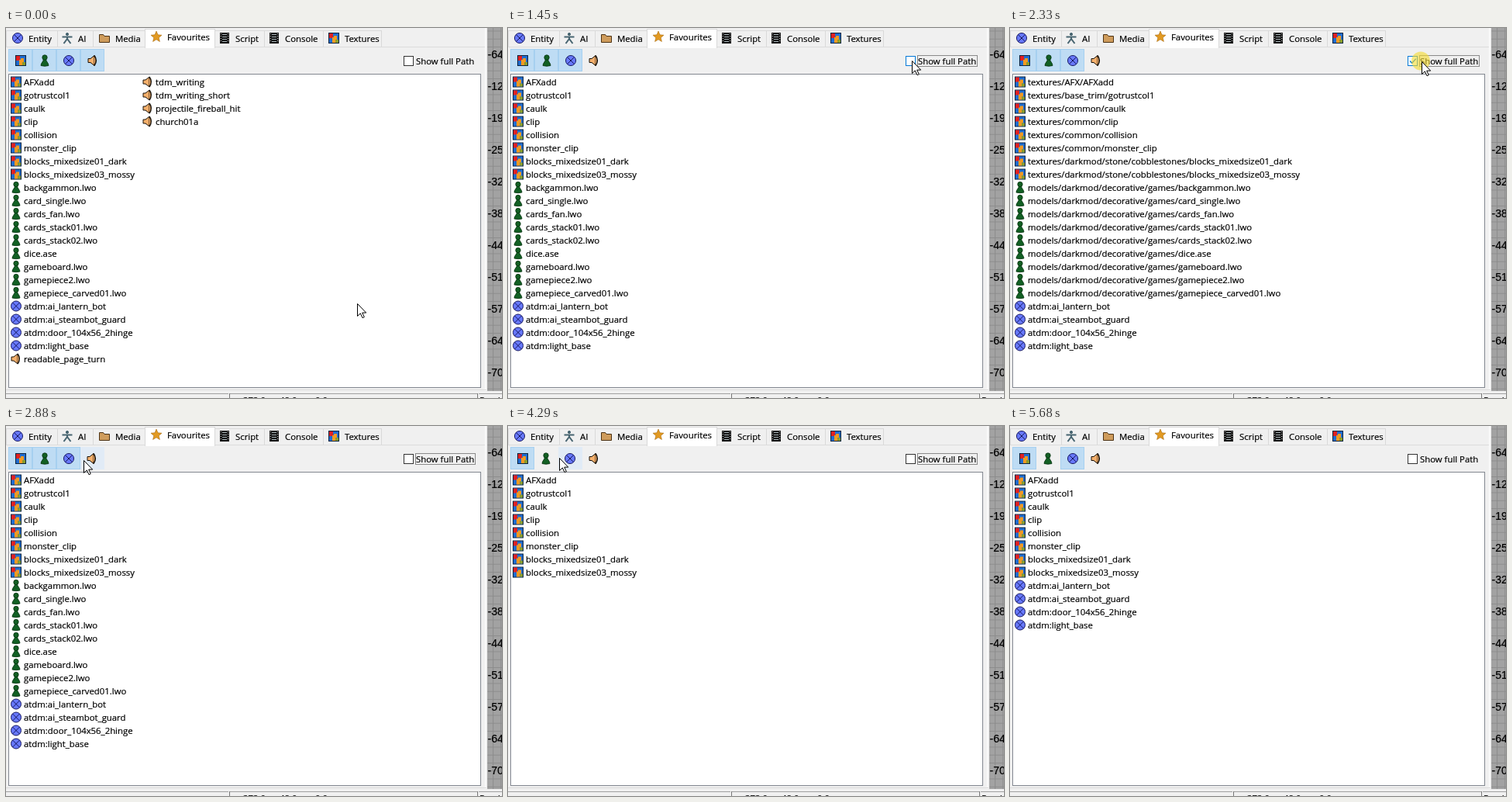
An HTML page for the animation above (5770 ms loop, 640x477 px).

```html
<!DOCTYPE html>
<html lang="en">
<head>
<meta charset="utf-8">
<title>Favourites panel</title>
<style>
  html, body { margin: 0; width: 100%; height: 100%; overflow: hidden; background: #f0f0f0; }
  svg { display: block; width: 640px; height: 477px; }
  text { font: 11.35px "Open Sans", "Noto Sans", sans-serif; white-space: pre; stroke: #000; stroke-width: .2px; }
  .ruler { font: 14px "Liberation Sans", Arial, sans-serif; }
</style>
</head>
<body>
<svg viewBox="0 0 640 477">
  <defs>
    <g id="texture">
      <rect x="-7" y="-7" width="14" height="14" fill="#0b2440"/>
      <path d="M-6-6h12v12h-12z" fill="#1f6cd0"/>
      <path d="M-6-6h5v6h-5z" fill="#e02020"/>
      <path d="M-2-1h2v-2h4v5h-2v4h-4z" fill="#f39a22"/>
      <path d="M2 2h4v4h-4z" fill="#8a9c2c"/>
    </g>
    <g id="model" fill="#126024" stroke="#06300f" stroke-width=".8">
      <path d="M-1.5-2C-1.5 1-5 3-5 6.5Q0 8 5 6.5C5 3 1.5 1 1.5-2z"/>
      <circle cy="-4" r="3.2"/>
    </g>
    <g id="entity" stroke="#15175c">
      <circle r="6.5" fill="#6879ff"/>
      <path d="M-4.5-4.5l9 9M4.5-4.5l-9 9"/>
    </g>
    <g id="sound" stroke="#161008">
      <path d="M-6-2.5h3l5-4v13l-5-4h-3z" fill="#f5b06c"/>
      <path d="M2-6.5q4.5 6.5 0 13" fill="#f5b06c" stroke-width="1.6"/>
    </g>
    <g id="person" fill="none" stroke="#476470" stroke-width="2">
      <circle cy="-5" r="1.6" fill="#476470" stroke-width="1"/>
      <path d="M-6.5-1.5h13M0-2v4M-4.5 7L0 1l4.5 6"/>
    </g>
    <path id="folder" d="M-6.5 5.5v-10h5l1.5 2h6.5v8z" fill="#cf9c5c" stroke="#4c3214"/>
    <path id="star" d="M0-7l2 4.8 5 .4-3.8 3.3 1.2 5L0 3.8-4.4 6.5l1.2-5L-7-1.8l5-.4z" fill="#e29a22" stroke="#a8690f" stroke-width=".6"/>
    <g id="script">
      <path d="M-6-7h12v14h-12z" fill="#111"/>
      <path d="M-3-4.5h6M-3-1.5h6M-3 1.5h6M-3 4.5h6" stroke="#a9b4b8"/>
      <path d="M-4.7-6v12M4.7-6v12" stroke="#ddd" stroke-dasharray="1 2"/>
    </g>
    <path id="arrow" d="M.5.5v16l3.8-3.6 2.7 5.8 2.3-1-2.6-5.6h5z" fill="#fff" stroke="#000"/>
    <pattern id="grid" x="628" y="3.5" width="10.25" height="10.25" patternUnits="userSpaceOnUse">
      <path d="M.5 0v10.25M0 .5h10.25" stroke="#8c8c8c"/>
    </pattern>
  </defs>
  <g id="frame"></g>
  <g id="content"></g>
</svg>
<script>
const LOOP = 5770, STEP = 77;

const icon = (name, x, y) => `<use href="#${name}" x="${x}" y="${y}"/>`;
const label = (text, x, y, extra = '') => `<text x="${x}" y="${y}" ${extra}>${text}</text>`;
const box = (x, y, w, h, fill, stroke = 'none', extra = '') =>
  `<rect x="${x}" y="${y}" width="${w}" height="${h}" fill="${fill}" stroke="${stroke}" ${extra}/>`;

const games = 'models/darkmod/decorative/games/';
const stones = 'textures/darkmod/stone/cobblestones/';
const common = 'textures/common/';
const group = (kind, ...entries) =>
  entries.flatMap(([path, names]) => names.split(' ').map(name => ({ kind, path, name })));
const favourites = [
  ...group('texture', ['textures/AFX/', 'AFXadd'], ['textures/base_trim/', 'gotrustcol1'],
    [common, 'caulk clip collision monster_clip'],
    [stones, 'blocks_mixedsize01_dark blocks_mixedsize03_mossy']),
  ...group('model', [games, 'backgammon.lwo card_single.lwo cards_fan.lwo cards_stack01.lwo ' +
    'cards_stack02.lwo dice.ase gameboard.lwo gamepiece2.lwo gamepiece_carved01.lwo']),
  ...group('entity', ['', 'atdm:ai_lantern_bot atdm:ai_steambot_guard atdm:door_104x56_2hinge atdm:light_base']),
  ...group('sound', ['', 'readable_page_turn tdm_writing tdm_writing_short projectile_fireball_hit church01a'])
];
const kinds = ['texture', 'model', 'entity', 'sound'];

// Pointer moves: first step, last step, destination
const moves = [
  [70, 610, 109, 38], [910, 1300, 515, 42], [1370, 1450, 521, 42], [1530, 1610, 531, 43],
  [2490, 2880, 100, 44], [3030, 3110, 97, 43], [3260, 3420, 81, 41], [3740, 3820, 60, 40],
  [3910, 3990, 50, 40], [4280, 4370, 81, 41], [4600, 4670, 99, 63],
  [4750, 5060, 452, 437], [5130, 5130, 452, 451]
];
const clicks = [760, 1690, 2330, 3490, 4060, 4440];
const within = (t, from, to) => t >= from && t < to;

function pointerAt(t) {
  let x = 453, y = 355;
  for (const [start, end, toX, toY] of moves) {
    if (t < start) break;
    const count = Math.round((end - start) / STEP) + 1;
    const p = Math.min(1, (Math.floor((t - start + 8) / STEP) + 1) / count);
    const eased = p * p * (3 - 2 * p);
    x += (toX - x) * eased;
    y += (toY - y) * eased;
  }
  return { x: Math.round(x), y: Math.round(y) };
}

function drawFrame() {
  // Text, icon, left edge, right edge, icon centre
  const tabs = [
    ['Entity', 'entity', 0, 66, 15], ['AI', 'person', 66, 112, 79], ['Media', 'folder', 112, 179, 127],
    ['Script', 'script', 269, 333, 282], ['Console', 'script', 333, 409, 346], ['Textures', 'texture', 409, 484, 423]
  ];
  let out = box(0, 0, 640, 477, '#f0f0f0');
  for (const [text, name, left, right, centre] of tabs) {
    out += box(left + .5, 3.5, right - left, 21, '#f0f0f0', '#d9d9d9');
    out += icon(name, centre, 13) + label(text, centre + 14, 18);
  }
  out += '<path d="M0 24.5h618" stroke="#dcdcdc"/>';
  out += box(179.5, 1.5, 90, 24, '#fff', '#d9d9d9') + box(180, 24, 89, 2, '#fff');
  out += icon('star', 194, 11) + label('Favourites', 208, 16);
  out += box(3.5, 59.5, 609, 404, '#fff', '#828790');

  out += box(618, 0, 1, 468, '#fff');
  out += box(621, 0, 19, 468, '#a2a2a2') + box(621, 0, 19, 468, 'url(#grid)');
  [64, 12, 19, 25, 32, 38, 44, 51, 57, 64, 70].forEach((n, i) =>
    out += label('-' + n, 621.5, 39 + 41 * i, 'class="ruler"'));

  out += '<path d="M0 466.5h620" stroke="#dadada"/>';
  out += '<path d="M0 471.5h287M289 471.5h319M610 471.5h30" stroke="#a0a0a0"/>';
  out += '<path d="M288.5 471v6M608.5 471v6" stroke="#777"/>';
  out += label('272.0', 306, 484) + label('48.0', 353, 484) + label('0.0', 399, 484) + label('Ready', 611, 484);
  document.getElementById('frame').innerHTML = out;
}

function drawContent(t) {
  const { x, y } = pointerAt(t);
  const shown = {
    texture: true,
    model: t < 4140,
    entity: !within(t, 3570, 4520),
    sound: t < 840
  };
  const fullPath = within(t, 1770, 2410);
  const inside = (left, top, w, h, px = x) => within(px, left, left + w) && within(y, top, top + h);
  let out = '';

  kinds.forEach((kind, i) => {
    const left = 3 + 31 * i;
    if (shown[kind]) out += box(left + .5, 27.5, 30, 28, '#bedcf4', '#a6d0f0');
    else if (inside(left, 27, 31, 30, x + 6)) out += box(left, 27, 31, 29, '#e1ebf6');
    out += icon(kind, left + (shown[kind] ? 16 : 15), 42);
  });

  const overCheck = inside(513, 35, 93, 16);
  const checkColour = overCheck ? '#0078d7' : '#333';
  out += box(513.5, 36.5, 12, 12, '#fff', checkColour);
  if (fullPath) out += `<path d="M516 42.5l2.7 2.8 5-5.6" fill="none" stroke="${checkColour}" stroke-width="1.3"/>`;
  out += label('Show full Path', 529, 47);
  if (within(t, 840, 5680)) out += box(528.5, 35.5, 77, 14, 'none', '#222', 'stroke-dasharray="1 1"');

  favourites.filter(f => shown[f.kind]).forEach(({ kind, path, name }, i) => {
    const left = 5 + 170 * Math.floor(i / 22), top = 61 + 17 * (i % 22);
    if (t < 5210 && inside(left, top, 170, 17)) out += box(left, top, 170, 17, '#e5f3ff');
    out += icon(kind, left + 8, top + 8.5) + label((fullPath ? path : '') + name, left + 18, top + 13);
  });

  if (clicks.some(c => within(t, c, c + 150)))
    out += `<circle cx="${x - 1}" cy="${y - .5}" r="12" fill="#f5dc32" opacity=".62"/>`;
  if (t < 5210) out += icon('arrow', x, y);
  return out;
}

drawFrame();
const content = document.getElementById('content');
const began = performance.now();
let previous = '';
function tick() {
  const markup = drawContent((performance.now() - began) % LOOP);
  if (markup !== previous) content.innerHTML = previous = markup;
  requestAnimationFrame(tick);
}
tick();
</script>
</body>
</html>
```
